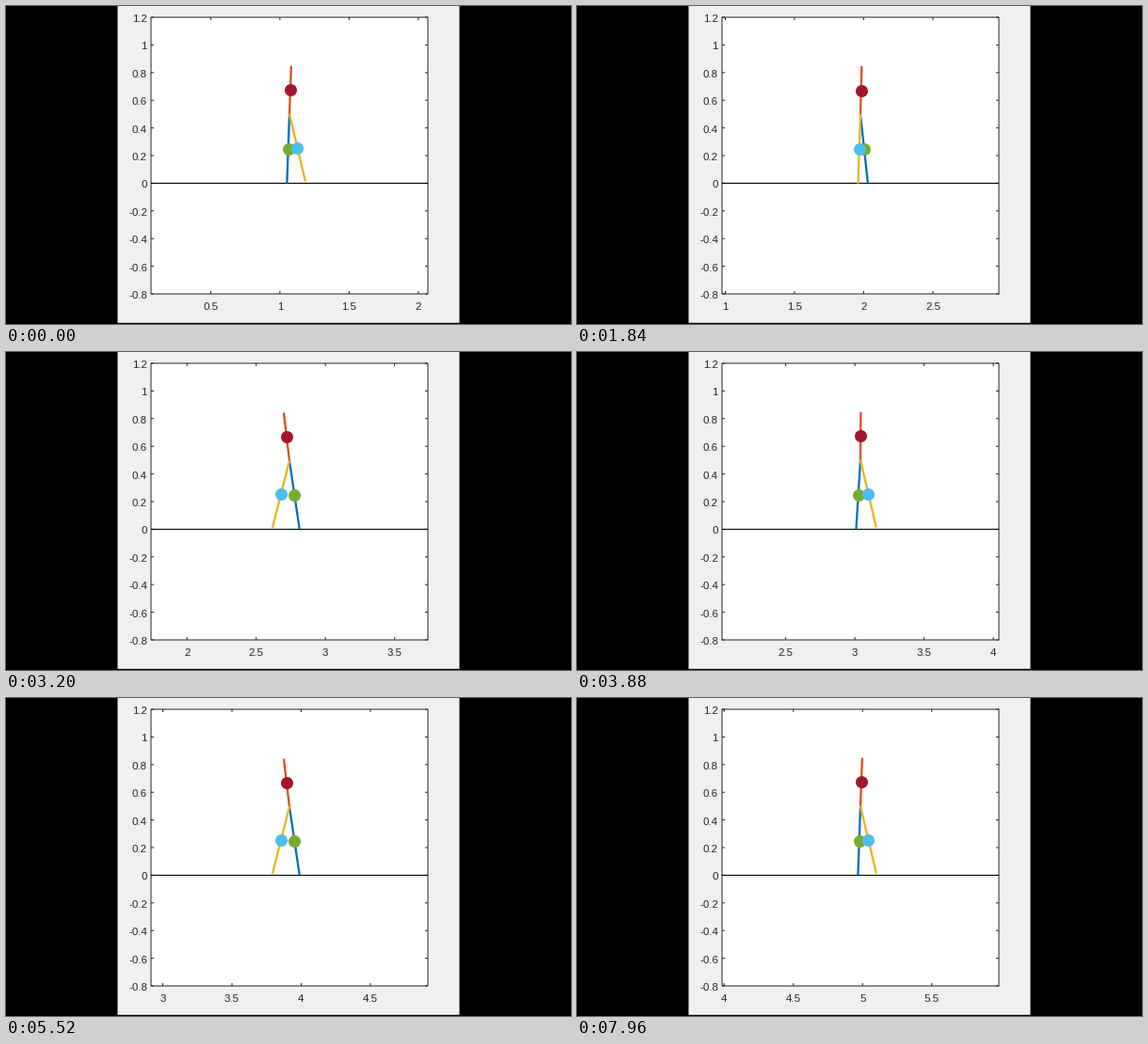
These frames come from a looping animation (600 px wide and 338 px high, 8000 ms). A matplotlib script:

```python
import numpy as np
import matplotlib.pyplot as plt
from matplotlib.animation import FuncAnimation
from matplotlib.patches import Rectangle

W, H, DPI = 600, 338, 100
FRAMES, INTERVAL = 200, 40
PT = 72 / DPI                      # points per pixel

# Plot box in pixels, same scale on both axes
LEFT, TOP, UNIT = 154, 12, 147
RIGHT, BOTTOM = LEFT + 2 * UNIT, TOP + 2 * UNIT
MID = LEFT + UNIT
GROUND = TOP + 1.2 * UNIT

INK = "#262626"
BLUE, ORANGE, YELLOW = "#0072BD", "#D95319", "#EDB120"
GREEN, CYAN, RED = "#77AC30", "#4DBEEE", "#A2142F"

LEG, TORSO = 0.5, 0.35
FIRST_FOOT, STRIDE = 1.051, 0.1958
START = -0.073                     # hip relative to the new stance foot

# Pace: (frame, steps walked so far)
PACE = [(0, 0.726), (30, 3.623), (63, 7.25), (97, 10.768),
        (138, 15.02), (166, 17.768), (199, 20.726)]

plt.rcParams["font.family"] = "Liberation Sans"
fig = plt.figure(figsize=(W / DPI, H / DPI), dpi=DPI, facecolor="black")
ax = fig.add_axes([0, 0, 1, 1])
ax.set_xlim(0, W)
ax.set_ylim(H, 0)
ax.axis("off")


def stroke(xs, ys, color=INK, width=1.0, z=2):
    return ax.plot(xs, ys, color=color, lw=width * PT, zorder=z,
                   solid_capstyle="butt", snap=False)[0]


def label(x, y, text, align):
    return ax.text(x, y, text, ha=align, va="baseline", color=INK,
                   fontsize=11.5 * PT, zorder=3)


def dot(color, z):
    return ax.plot([], [], "o", color=color, ms=13 * PT, mew=0,
                   zorder=z, snap=False)[0]


def box(x0, y0, x1, y1, **style):
    ax.add_patch(Rectangle((x0, y0), x1 - x0, y1 - y0, snap=False, **style))


box(118.5, 0, 481.5, 336.8, fc="#F0F0F0", lw=0)
box(LEFT, TOP, RIGHT, BOTTOM, fc="white", ec=INK, lw=PT)

for n in range(-4, 7):
    y = GROUND - n / 5 * UNIT
    stroke([LEFT, LEFT + 3], [y, y])
    stroke([RIGHT - 3, RIGHT], [y, y])
    label(150, y + 5, f"{n / 5:g}", "right")

stroke([LEFT, RIGHT], [GROUND, GROUND], "black", 1.1, 4)

ticks = [(stroke([], []), stroke([], []), label(0, 323, "", "center"))
         for _ in range(5)]

stance = stroke([], [], BLUE, 2.3, 5)
torso = stroke([], [], ORANGE, 2.3, 6)
swing = stroke([], [], YELLOW, 2.3, 7)
stance_dot, torso_dot, swing_dot = dot(GREEN, 8), dot(RED, 9), dot(CYAN, 10)


def ease(t):
    t = np.clip(t, 0, 1)
    return t * t * (3 - 2 * t)


def hip_lead(v):
    """Hip ahead of the stance foot: slow after impact, then faster."""
    return START + STRIDE * v ** 2.4


def swing_reach(v):
    """Swing foot ahead of the hip: thrown forward, then drawn back."""
    return -0.123 + 0.238 * ease((v - 0.14) / 0.52) - 0.042 * ease(4 * v - 3)


def torso_lean(v):
    """Head ahead of the hip: one nod per step."""
    return -0.041 + 0.074 * np.sin(np.pi * v ** 1.233) ** 2


def rise(x, length):
    return np.sqrt(length ** 2 - x ** 2)


def point(x, y):
    return MID + x * UNIT, GROUND - y * UNIT


def place_limb(line, mass, start, end):
    line.set_data([start[0], end[0]], [start[1], end[1]])
    mass.set_data([(start[0] + end[0]) / 2], [(start[1] + end[1]) / 2])


def place_ticks(hip):
    first = int(np.ceil((hip - 1) * 2))
    for i, (low, high, text) in enumerate(ticks):
        value = (first + i) / 2
        for part in (low, high, text):
            part.set_visible(value <= hip + 1)
        x = MID + (value - hip) * UNIT
        low.set_data([x, x], [BOTTOM - 3, BOTTOM])
        high.set_data([x, x], [TOP, TOP + 3])
        text.set_x(x)
        text.set_text(f"{value:g}")


def draw(frame):
    count, v = divmod(np.interp(frame, *zip(*PACE)), 1)
    lead, foot, head = hip_lead(v), swing_reach(v), torso_lean(v)
    place_ticks(FIRST_FOOT + STRIDE * count + lead)

    hip_y = rise(lead, LEG)
    hip = point(0, hip_y)
    place_limb(stance, stance_dot, hip, point(-lead, 0))
    place_limb(torso, torso_dot, hip, point(head, hip_y + rise(head, TORSO)))
    place_limb(swing, swing_dot, hip, point(foot, hip_y - rise(foot, LEG)))
    return []


anim = FuncAnimation(fig, draw, frames=FRAMES, interval=INTERVAL,
                     init_func=lambda: draw(0), repeat=True,
                     repeat_delay=0, blit=False)
plt.show()
```
